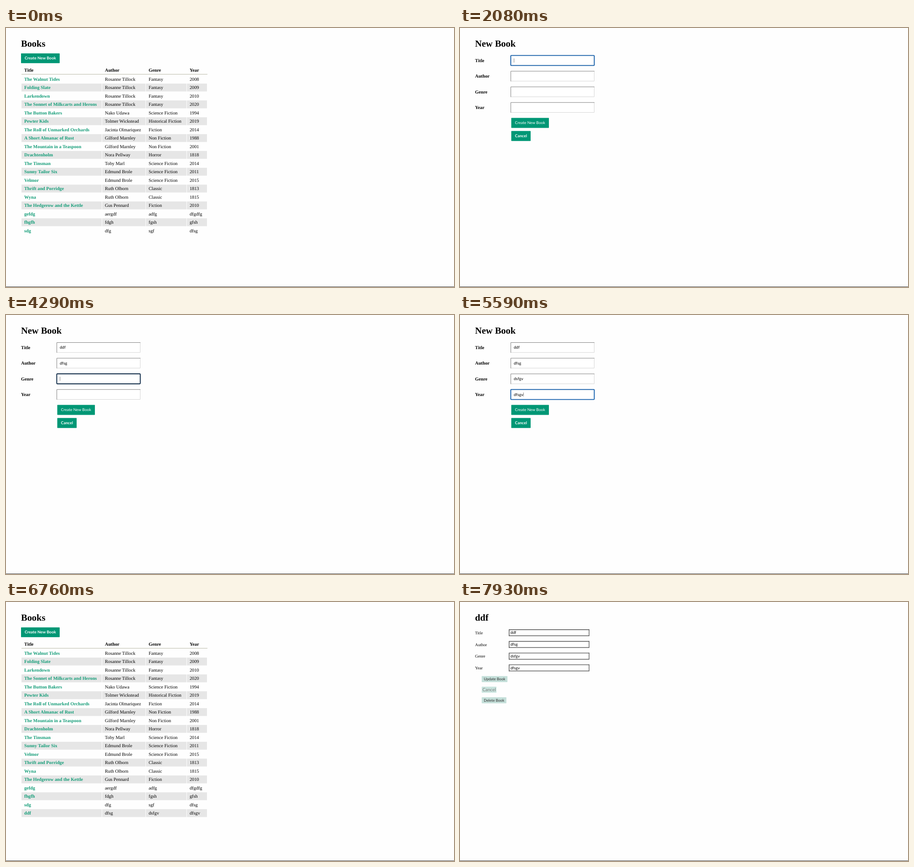
These frames come from a looping animation (983x569 px, 8 s). An HTML page:

```html
<!DOCTYPE html>
<html lang="en">
<head>
<meta charset="utf-8">
<title>Books</title>
<style>
  html, body { margin: 0; width: 100%; height: 100%; overflow: hidden; background: #fefefe; }
  svg { display: block; text-rendering: geometricPrecision; }
  .serif { font-family: "Liberation Serif", serif; }
  .sans { font-family: Lato, sans-serif; }
</style>
</head>
<body>
<svg id="stage" width="983" height="569" viewBox="0 0 983 569"></svg>
<script>
const LOOP = 8000, STEP = 130, FADE = 500;
const GREEN = [0, 151, 117], DARK_GREEN = [0, 128, 98];
const WHITE = [255, 255, 255], BLACK = [0, 0, 0];
const LABELS = ['Title', 'Author', 'Genre', 'Year'];
const ENTRY = ['ddf', 'dfsg', 'dsfgv', 'dfsgv'];

const BOOKS = `The Walnut Tides|Rosanne Tillock|Fantasy|2008
Folding Slate|Rosanne Tillock|Fantasy|2009
Larkendown|Rosanne Tillock|Fantasy|2010
The Sonnet of Milkcarts and Herons|Rosanne Tillock|Fantasy|2020
The Button Bakers|Nako Udawa|Science Fiction|1994
Pewter Kids|Tolmer Wickstead|Historical Fiction|2019
The Roll of Unmarked Orchards|Jacinta Olmariquez|Fiction|2014
A Short Almanac of Rust|Gilford Marnley|Non Fiction|1988
The Mountain in a Teaspoon|Gilford Marnley|Non Fiction|2001
Drachtenholm|Nora Pellway|Horror|1818
The Tinsman|Toby Marl|Science Fiction|2014
Sunny Tailor Six|Edmund Brole|Science Fiction|2011
Velmor|Edmund Brole|Science Fiction|2015
Thrift and Porridge|Ruth Olborn|Classic|1813
Wyna|Ruth Olborn|Classic|1815
The Hedgerow and the Kettle|Gus Pennard|Fiction|2010
gefdg|aergdf|adfg|dfgdfg
fhgfh|fdgh|fgsh|gfsh
sdg|dfg|sgf|dfsg`.split('\n').map(line => line.split('|'));

// Typing: [time, focused field, letters typed so far, caret shown]
const KEYS = [
  [1820, 0, 0, 1], [2340, 0, 0, 0], [2600, 0, 1, 1], [2730, 0, 2, 1], [2860, 0, 3, 1],
  [3250, 1, 0, 1], [3380, 1, 1, 1], [3510, 1, 2, 1], [3640, 1, 4, 1], [4030, 1, 4, 0],
  [4290, 2, 0, 1], [4420, 2, 1, 1], [4550, 2, 2, 1], [4680, 2, 3, 1], [4810, 2, 5, 1],
  [5200, 3, 0, 1], [5330, 3, 1, 1], [5460, 3, 3, 1], [5590, 3, 5, 1]
];

const stage = document.getElementById('stage');
const pen = document.createElement('canvas').getContext('2d');

const lerp = (a, b, p) => a + (b - a) * p;
const mix = (a, b, p) => `rgb(${a.map((v, i) => Math.round(lerp(v, b[i], p)))})`;
const gray = v => [v, v, v];

// The CSS "ease" curve, solved by bisection
function ease(x) {
  if (x <= 0) return 0;
  if (x >= 1) return 1;
  let lo = 0, hi = 1, u;
  for (let i = 0; i < 20; i++) {
    u = (lo + hi) / 2;
    if (0.75 * u * (1 - u) + u ** 3 < x) lo = u; else hi = u;
  }
  return 0.3 * u * (1 - u) ** 2 + 3 * u * u * (1 - u) + u ** 3;
}
const progress = (t, start) => ease((t - start) / FADE);

function width(str, size, bold) {
  pen.font = `${bold ? 700 : 400} 100px Lato, sans-serif`;
  return pen.measureText(str).width * size / 100;
}

const rect = (x, y, w, h, fill, extra = '') =>
  `<rect x="${x}" y="${y}" width="${w}" height="${h}" fill="${fill}" ${extra}/>`;

const text = (str, x, y, size, { face = 'serif', bold = false, fill = '#000' } = {}) =>
  `<text class="${face}" x="${x}" y="${y}" font-size="${size}" font-weight="${bold ? 700 : 400}" fill="${fill}">${str}</text>`;

const heading = str => text(str, 33, 41, 20.45, { bold: true });

function button(label, x, y, h, pad, size, bold, bg, fill) {
  return rect(x, y, width(label, size, bold) + 2 * pad, h, bg, 'rx="0.8"') +
    text(label, x + pad, y + h / 2 + size * 0.345, size, { face: 'sans', bold, fill });
}

function listPage(books, p, buttonHover, linkHover) {
  const bold = p > 0.65;
  const pad = lerp(0.6, 6, p), pitch = lerp(13.2, 18.5, p), rowHeight = pitch - 1.2;
  const headY = lerp(80, 92.6, p), shrink = 2 * (6 - pad);
  const columns = [[34, 176], [211, 95], [307, 89], [397, 44]]
    .map(([x, w], i) => [x - i * shrink, w - shrink]);
  const green = mix(BLACK, [18, 156, 119], p);

  let out = heading('Books') +
    button('Create New Book', 33, 55.7, lerp(11, 21.5, p), 8 * p, 8.75, true,
      buttonHover ? mix(GREEN, DARK_GREEN, buttonHover) : mix(WHITE, GREEN, p), mix(gray(100), WHITE, p));

  columns.forEach(([x, w], i) => {
    out += text(LABELS[i], x + pad, headY + 3.4, 10.24, { bold: true }) +
      rect(x, headY + rowHeight / 2, w + 1, 0.9, mix(WHITE, [176, 176, 156], p));
  });
  books.forEach((book, r) => {
    const y = headY + 1.2 + pitch * (r + 1);
    columns.forEach(([x, w], c) => {
      if (r % 2) out += rect(x, y - rowHeight / 2, w, rowHeight, mix(WHITE, gray(230), p));
      const hovered = c === 0 && r === 19 && linkHover;
      const fill = c ? '#000' : hovered ? mix([18, 156, 119], DARK_GREEN, linkHover) : green;
      out += text(book[c], x + pad, y + 3.4, 10.24, { bold: !c && bold, fill });
    });
  });
  return out;
}

function inputBox(x, y, w, h, p) {
  const line = lerp(1.5, 1, p), o = line / 2;
  const stroke = (d, color) => `<path d="${d}" fill="none" stroke="${color}" stroke-width="${line}"/>`;
  return rect(x, y, w, h, '#fff') +
    stroke(`M${x + w - o} ${y}V${y + h - o}H${x}`, mix(gray(66), gray(214), p)) +
    stroke(`M${x + o} ${y + h}V${y + o}H${x + w}`, mix(gray(66), gray(128), p));
}

function formPage(title, values, buttons, p, focus, hover = 0) {
  const bold = p > 0.65;
  const x = lerp(106.2, 111, p), w = lerp(281.5, 295, p) - x;
  const h = lerp(13.3, 22.8, p), pitch = lerp(23.8, 34.4, p), pad = lerp(2.8, 7, p);
  let out = heading(title);

  LABELS.forEach((label, i) => {
    const y = 60 + i * pitch, mid = y + h / 2, value = values[i];
    out += text(label, 33, mid + 3.3, lerp(8.96, 10.24, p), { bold }) + inputBox(x, y, w, h, p) +
      text(value, x + pad, mid + 2.9, 8.7, { face: 'sans' });
    if (focus && focus.field === i) {
      out += rect(x + 0.4, y + 0.4, w - 0.8, h - 0.8, 'none',
        `rx="1.2" stroke="${mix(BLACK, [18, 94, 172], focus.glow)}" stroke-width="1.9"`);
      if (focus.caret) out += rect(x + pad + width(value, 8.7) + 0.2, mid - 4.5, 0.7, 9, '#555');
    }
  });

  const bx = lerp(33.3, 112.5, p), bh = lerp(11.2, 22, p);
  const firstY = lerp(155.2, 197.5, p), cancelY = lerp(177.2, 226.3, p);
  buttons.forEach((label, i) => {
    const y = firstY + i * (cancelY - firstY);
    out += label === 'Cancel'
      ? button(label, bx, y, bh, 8.1 * p, lerp(10.2, 8.8, p), bold, mix(gray(245), GREEN, p), mix(gray(95), WHITE, p))
      : button(label, bx, y, bh, lerp(3.8, 8.1, p), lerp(8.15, 8.55, p), false,
          hover ? mix(GREEN, DARK_GREEN, hover) : mix(gray(239), GREEN, p), mix(BLACK, WHITE, p));
  });
  return out;
}

function newBookPage(t) {
  const key = KEYS.filter(k => k[0] <= t).pop();
  let focus = null, values = ['', '', '', ''];
  if (key) {
    const [, field, typed, caret] = key;
    const since = KEYS.find(k => k[1] === field)[0];
    focus = { field, caret, glow: progress(t, since - 120) };
    values = ENTRY.map((word, i) => i < field ? word : i === field ? word.slice(0, typed) : '');
  }
  return formPage('New Book', values, ['Create New Book', 'Cancel'],
    progress(t, 927), focus, progress(t, 5870));
}

function page(t) {
  if (t < 1040) return listPage(BOOKS, 1, progress(t, 280), 0);
  if (t < 6370) return newBookPage(t);
  if (t < 7800) return listPage([...BOOKS, ENTRY], progress(t, 6257), 0, progress(t, 7170));
  return formPage('ddf', ENTRY, ['Update Book', 'Cancel', 'Delete Book'], progress(t, 7856));
}

let shown = -1;
function draw(now) {
  const t = Math.floor(now % LOOP / STEP) * STEP;
  if (t !== shown) {
    shown = t;
    stage.innerHTML = rect(0, 0, 983, 569, '#fefefe') + page(t) + rect(0, 568, 983, 1, '#484848');
  }
  requestAnimationFrame(draw);
}
draw(performance.now());
</script>
</body>
</html>
```
